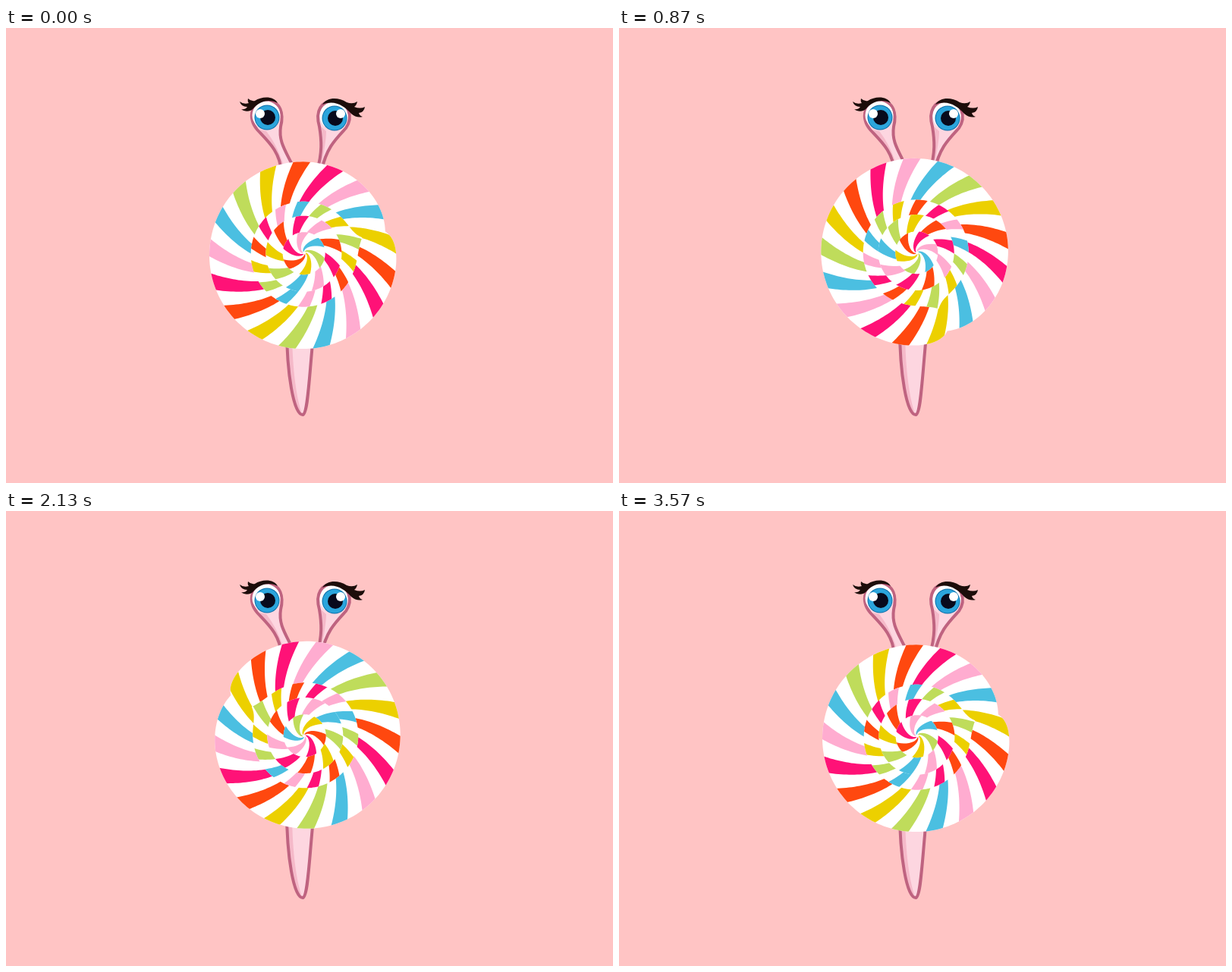
These frames come from a looping animation (800x600 px, 3.6 s). An HTML page with a canvas:

```html
<!DOCTYPE html>
<html lang="en">
<head>
<meta charset="utf-8">
<title>Lollipop snail</title>
<style>
  html, body { margin: 0; width: 100%; height: 100%; overflow: hidden; background: #ffc4c4; }
  canvas { display: block; }
</style>
</head>
<body>
<canvas id="stage" width="800" height="600"></canvas>
<script>
const ctx = document.getElementById('stage').getContext('2d');
const RAD = Math.PI / 180;
const CANDY = ['#ecd000', '#ff480f', '#ff1277', '#ffacd0', '#4bbfe1', '#bfdc5b'];
const LINE = '#bf6380', SKIN = '#fdd6e0', SHADE = '#f5b9c9', LASH = '#1c0d0a';
const SEAM = -16, TWIST = 0.6;

// Coils of the rope from the rim inwards; dip is how far the edge sinks at the seam.
const coils = [
  { radius: 123.5, dip: 11, count: 17, start: -6 },
  { radius: 69.5, dip: -11, count: 14, start: -13 },
  { radius: 50, dip: 0, count: 9, start: -12 },
  { radius: 28, dip: 0, count: 6, start: -32 }
];

// The sweet sits slightly off its pivot, more so towards the rim.
const place = (r, deg) => [
  r * (Math.cos(deg * RAD) - 0.012),
  r * (Math.sin(deg * RAD) + 0.025)
];

function polygon(points) {
  const path = new Path2D();
  points.forEach(p => path.lineTo(...p));
  path.closePath();
  return path;
}

function edgePath({ radius, dip }) {
  const points = [];
  for (let d = 0; d < 360; d += 2) {
    const fade = dip > 0 ? Math.min(d / 6, (360 - d) / 20) : Math.min(d / 10, (360 - d) / 6);
    points.push(place(radius - dip * Math.exp(-fade), SEAM + d));
  }
  return polygon(points);
}

// A wedge that twists logarithmically towards the middle.
function stripePath(radius, angle, width) {
  const left = [], right = [];
  for (let r = 2; r < radius + 14; r += 3) {
    const a = angle + TWIST * Math.log(r / radius) / RAD;
    left.push(place(r, a - width / 2));
    right.unshift(place(r, a + width / 2));
  }
  return polygon(left.concat(right));
}

let total = 0;
for (const coil of coils) {
  const step = 360 / coil.count;
  coil.shape = edgePath(coil);
  coil.stripes = Array.from({ length: coil.count }, (_, i) => ({
    color: CANDY[total++ % 6],
    path: stripePath(coil.radius, coil.start + i * step, step / 2)
  }));
}

function drawLollipop(angle) {
  ctx.save();
  ctx.translate(393, 296.5);
  ctx.rotate(angle * RAD);
  for (const { shape, stripes } of coils) {
    ctx.save();
    ctx.clip(shape);
    ctx.fillStyle = '#fff';
    ctx.fillRect(-140, -140, 280, 280);
    for (const { color, path } of stripes) {
      ctx.fillStyle = color;
      ctx.fill(path);
    }
    ctx.restore();
  }
  ctx.restore();
}

function fill(path, color) {
  ctx.fillStyle = color;
  ctx.fill(new Path2D(path));
}

function body(outline, shade) {
  fill(outline, SKIN);
  fill(shade, SHADE);
  ctx.strokeStyle = LINE;
  ctx.lineWidth = 4;
  ctx.stroke(new Path2D(outline));
}

function disc(x, y, r, color) {
  ctx.fillStyle = color;
  ctx.beginPath();
  ctx.arc(x, y, r, 0, 2 * Math.PI);
  ctx.fill();
}

function eye(x, y, shineX) {
  disc(x - 1, y - 3, 18.5, '#fff');
  disc(x, y, 16.5, '#0c6da8');
  disc(x, y, 15.5, '#2ba5dc');
  disc(x + 1, y, 10, '#080a1c');
  disc(shineX, 113, 6, '#fff');
}

function drawSnail() {
  body('M370 395 C370 455 379 510 391 510 C398 509 399 465 406 395 Z',
       'M371 395 C371 455 379 505 389 506 C381 480 377 440 377 395 Z');

  body('M363 190 C361 163 346 150 331 134 C318 119 323 97 343 96 C363 96 366 114 362 130 C359 150 368 161 380 186 Z',
       'M364 190 C361 163 348 150 334 134 L343 136 C353 149 360 162 369 190 Z');
  eye(344, 118, 335);
  fill('M358 99 C349 94 336 95 327 105 C322 111 315 111 310 107 Q315 108 318 104 Q310 104 308 97 Q313 101 320 99 Q318 97 319 93 Q323 97 328 96 C338 89 354 90 358 99 Z', LASH);

  body('M410 188 C417 164 416 148 413 130 C407 109 416 96 432 96 C452 97 458 117 448 132 C435 146 422 158 416 188 Z',
       'M413 185 C419 162 417 147 415 130 L422 136 C422 149 419 161 415 187 Z');
  eye(433, 119, 441);
  fill('M417 101 C423 91 438 91 449 98 Q457 101 463 97 Q462 102 459 104 Q467 107 473 104 Q472 111 465 112 Q466 116 470 117 Q462 119 455 113 C446 103 433 94 417 101 Z', LASH);
}

// The spin speeds up and slows down: [ms, degrees].
const spin = [[0, 0], [570, 58], [1200, 112], [1620, 159.5], [2130, 223.7], [3000, 315], [3570, 360]];

function spinAngle(ms) {
  const i = Math.max(1, spin.findIndex(([t]) => t >= ms));
  const [t0, a0] = spin[i - 1], [t1, a1] = spin[i];
  return a0 + (a1 - a0) * (ms - t0) / (t1 - t0);
}

function draw() {
  const ms = Math.floor(performance.now() % 3600 / 30) * 30;
  ctx.fillStyle = '#ffc4c4';
  ctx.fillRect(0, 0, 800, 600);
  drawSnail();
  drawLollipop(spinAngle(ms));
  requestAnimationFrame(draw);
}
draw();
</script>
</body>
</html>
```
